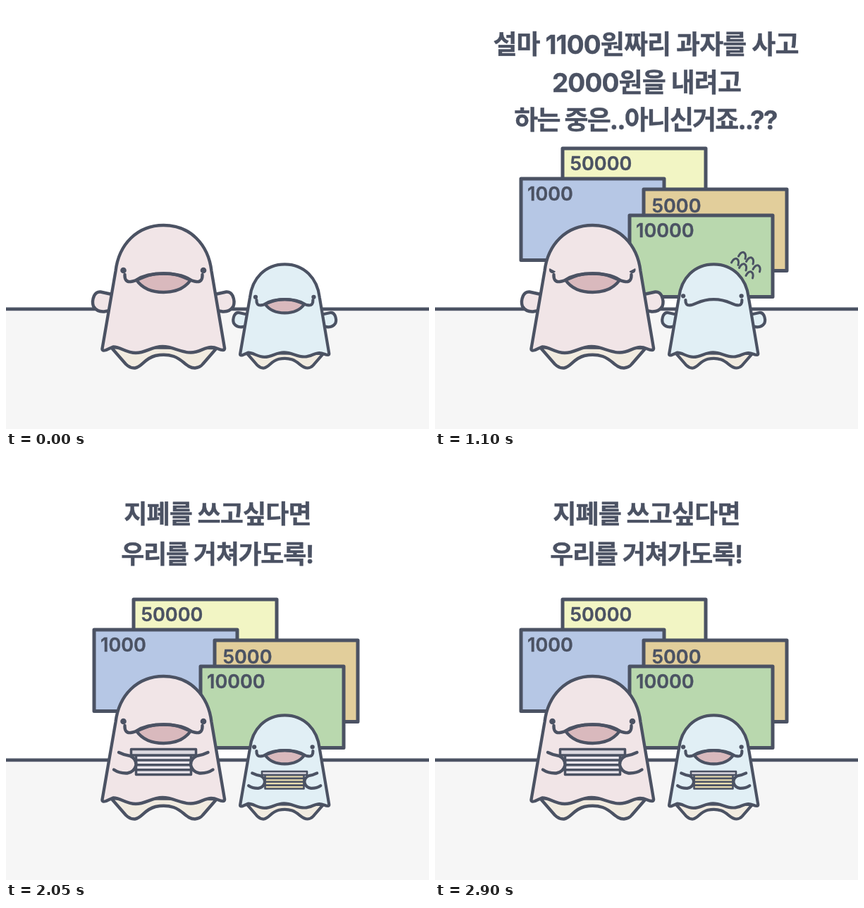
An HTML page for the animation above (2.95 s loop, 600 by 600 pixels).

```html
<!DOCTYPE html>
<html lang="ko">
<head>
<meta charset="utf-8">
<style>
  html, body { margin: 0; width: 100%; height: 100%; overflow: hidden; background: #fff; }
  svg { display: block; width: 100%; height: 100%; }
  .line, .line * { stroke: #4b5263; stroke-width: 4.4; stroke-linecap: round; stroke-linejoin: round; vector-effect: non-scaling-stroke; }
  .bill rect { stroke-width: 5; }
  .dot { fill: #4b5263; stroke: none !important; }
  .none { fill: none; }
  text { fill: #4b5263; stroke: #4b5263; stroke-width: .4; stroke-linejoin: round; }
  .say { font: 700 37px Inter, "Noto Sans CJK KR", "Noto Sans CJK", sans-serif; text-anchor: middle; }
  .line .num { font: 600 27px Inter, sans-serif; stroke-width: .4; }
  .sweat path { stroke-width: 3; }
  .small * { stroke-width: 4.2; }
  .cash rect, .cash path { stroke-width: 3.5; }
  .mini * { stroke-width: 2.6 !important; }
</style>
</head>
<body>
<svg id="stage" viewBox="0 0 600 600">
  <rect width="600" height="600" fill="#fff"/>
  <rect y="430" width="600" height="170" fill="#f6f6f6"/>
  <path d="M-5 429.800H605" class="line" style="stroke-width:4.7"/>
  <g id="bills"></g>
  <g id="figures"></g>
  <g id="sweat" class="line sweat none"></g>
  <g id="words"></g>
</svg>
<script>
const $ = id => document.getElementById(id);
const LOOP = 2950, HOLD = 450, STEP = 50;

// Bank notes, back to front: x, y, colour, label, label x, label baseline
const notes = [
  [181, 202, '#f2f5c4', '50000', 191.5, 232.5],
  [122, 245, '#b6c7e5', '1000', 131, 275.5],
  [296, 260, '#e2ce9b', '5000', 307.5, 292.5],
  [276, 297, '#b9d8ae', '10000', 285, 327.5]
];
$('bills').innerHTML = notes.map(([x, y, fill, label, tx, ty]) =>
  `<g class="line bill"><rect x="${x}" y="${y}" width="203" height="115.5" fill="${fill}"/>
   <text class="num" x="${tx}" y="${ty}">${label}</text></g>`).join('');
const blueNote = $('bills').children[1];

const both = shape => shape + `<g transform="matrix(-1 0 0 1 446.5 0)">${shape}</g>`;

const body = `M136.500 486 L155.500 376 C160 338 186 311 223.500 311 C261 311 287 338 291.500 376
  L310 485 Q310.500 488 307.500 488 C302 488 299 484 291 484 C281 484 275 491.500 262 491.500
  C246 491.500 238 483 222 483 C206 483 199 492 184 492 C170 492 162 483 152 483.500
  Q146 486 142 488 Q136 490 136.500 486 Z`;
const feet = `M149 484 L170 508 Q176 514 183 513.500 C193 512 196 500 212 496
  Q226 493 238 497 C252 502 256 513.500 268 513.500 Q275 513 279 508 L299 485 Z`;
const arm = 'M150 409 L134 405.500 Q128 405 125 411 Q121.500 419 124 426 Q129 434 139 433.500 L147 432';
const holdArm = 'M160 419 Q168 423 176 424 Q185 428 184.500 437 Q182 447 172 448.500 Q161 449 153 443.500';
const smile = `M168.500 381 Q168 392 177 391 C190 390 195 379.500 223.500 379.500
  C252 379.500 257 390 270 391 Q279 392 278.500 381`;
const mouth = 'M185 388.500 C195 382 206 379.500 223.500 379.500 C241 379.500 252 382 262 388.500 Q250 406 223.500 406 Q197 406 185 388.500 Z';
const frown = 'M162.500 372 L171 376.500 A4.600 4.600 0 0 1 162.500 372 Z';

function stack(x, y, w, h, inset, lip, fill, cls) {
  const left = x + inset, inner = w - 2 * inset, gap = (h - lip) / 4;
  const stripes = [1, 2, 3].map(i => `M${left} ${y + lip + gap * i}h${inner}`).join('');
  return `<g class="cash ${cls}">
    <rect x="${left}" y="${y + lip}" width="${inner}" height="${h - lip}" fill="${fill}"/>
    <path d="${stripes}"/>
    <rect x="${x}" y="${y}" width="${w}" height="${lip}" fill="#dcd9e0"/></g>`;
}

function figure(id, fill, place, cash, drop, cls) {
  return `<g id="${id}" class="line ${cls}">
    <g transform="${place}">
      <g class="wave" fill="${fill}">${both(`<path d="${arm}"/>`)}</g>
      <path d="${feet}" fill="#f1ebe0"/>
      <path d="${body}" fill="${fill}"/>
      <path class="mouth" d="${mouth}" fill="#d9b9bd"/>
      <path class="none" d="${smile}"/>
      <g class="eyes">${both('<circle class="dot" cx="166.500" cy="375" r="4.300"/>')}</g>
      <g class="frown">${both(`<path class="dot" d="${frown}"/>`)}</g>
    </g>
    <g class="hold">${cash}
      <g transform="${place} translate(0 ${drop})" fill="${fill}">${both(`<path d="${holdArm}"/>`)}</g>
    </g></g>`;
}

$('figures').innerHTML =
  figure('big', '#f1e5e7', 'translate(0 0)', stack(177.5, 414.5, 92, 36, 7, 8.5, '#e9e5ec', ''), 0, '') +
  figure('kid', '#e1eff5', 'translate(232.900 140.200) scale(.727)',
    stack(363, 446, 64, 24.5, 4.5, 5, '#e9ddb0', 'mini'), 5, 'small');

const hook = 'M420.500 364 Q424 357.500 428 358.500 Q432 361 430 367.500';
const row = (dx, dy) => `<g transform="translate(${dx} ${dy})">` +
  [[0, 0], [11, 7.5], [20.5, 18.5]].map(p => `<path transform="translate(${p})" d="${hook}"/>`).join('') + '</g>';
$('sweat').innerHTML = row(0, 0) + row(10, -9);

// Captions: text, centre x, baseline, size, letter spacing
const captions = [
  [["잠시만요\u00a0 '오늘만'씨,", 299, 118.2, 39, -.1]],
  [['설마 1100원짜리 과자를 사고', 299, 68, 37, -.9],
   ['2000원을 내려고', 300, 122, 37, -.9],
   ['하는 중은..아니신거죠..??', 298.5, 174.5, 37, -1.9]],
  [['지폐를 쓰고싶다면', 300, 94, 36, -.9],
   ['우리를 거쳐가도록!', 299.5, 151, 36, -1.3]]
];
$('words').innerHTML = captions.map(lines => '<g>' + lines.map(([s, x, y, size, gap]) =>
  `<text class="say" x="${x}" y="${y}" style="font-size:${size}px;letter-spacing:${gap}px">${s}</text>`
).join('') + '</g>').join('');

const show = (el, on) => el.style.display = on ? '' : 'none';
const all = (sel, on) => document.querySelectorAll(sel).forEach(el => show(el, on));

function draw(t) {
  const step = Math.floor((t - HOLD) / STEP);
  const scene = step < 0 ? 0 : step < 10 ? 1 : step < 20 ? 2 : 3;
  const holding = scene === 3, talking = scene === 1 || scene === 2;

  [...$('words').children].forEach((g, i) => show(g, i + 1 === scene));
  const pulse = step % 4 > 1 ? 1.055 : 1;
  $('words').children[2].setAttribute('transform', `translate(300 90) scale(${pulse}) translate(-300 -90)`);

  show($('bills'), scene > 1);
  blueNote.setAttribute('transform', `translate(${step % 2 ? 0 : 3} 0)`);

  all('.hold', holding);
  all('.wave', !holding);
  all('#big .eyes', scene !== 2);
  all('#big .frown', scene === 2);
  all('#kid .frown', false);
  all('#kid .mouth', scene !== 2);
  $('kid').querySelector('.eyes').setAttribute('transform', scene > 1 ? 'translate(-2.500 -2)' : '');

  // Sweat marks cycle: one row, two rows, none
  const beat = step % 3;
  show($('sweat'), talking && beat < 2);
  show($('sweat').children[1], beat === 1);
}

const start = performance.now();
function tick() {
  draw((performance.now() - start) % LOOP);
  requestAnimationFrame(tick);
}
tick();
</script>
</body>
</html>
```
